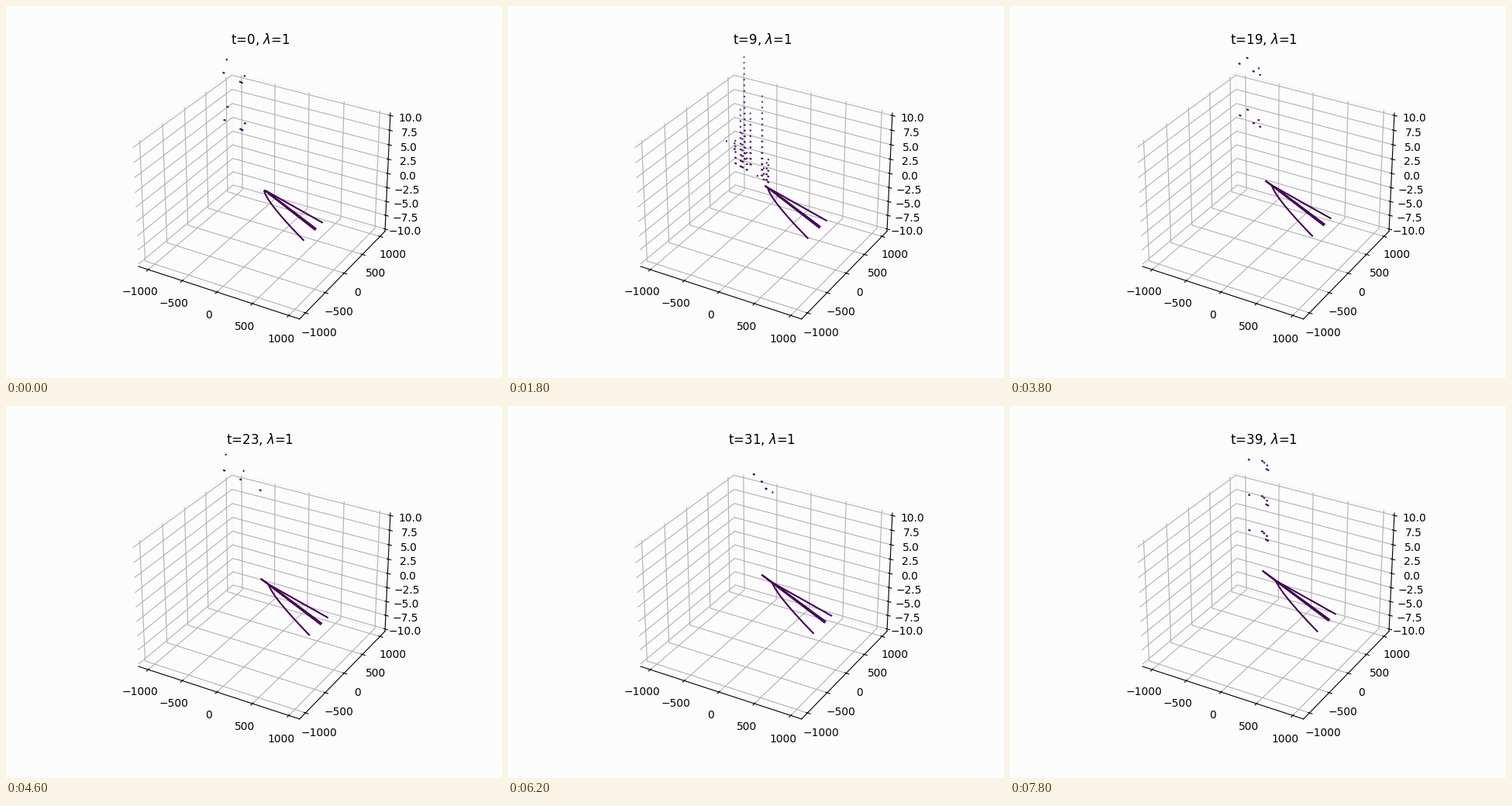
Recreate the animation shown at these times as a matplotlib script. Size 640x480 px, loop 8000 ms.

```python
import random

import numpy as np
import matplotlib.pyplot as plt
from matplotlib.animation import FuncAnimation
from matplotlib.collections import LineCollection

FRAMES, STEP_MS = 40, 200
W, H = 640, 480
TOP = 58               # upper clip edge of the plot, in pixels
LEVELS = 50
SLOPES = .58, .97      # two ridges that meet at the fork, on screen
LOW = "#440154"
BACK = "#fcfcfc"


def move(start, end, t):
    return np.array(start) + (np.array(end) - np.array(start)) * t / (FRAMES - 1)


def bezier(a, b, c):
    u = np.linspace(0, 1, 40)[:, None]
    return (1 - u) ** 2 * a + 2 * u * (1 - u) * b + u ** 2 * c


def fork_at(t):
    return move((335.5, 238.3), (344.5, 226), t)


def branches(t):
    fork = fork_at(t)
    tip = move((332.5, 237.2), (325, 211.8), t)
    upper = move((408.3, 279.3), (420, 268.3), t)
    mid = move((400, 287.3), (412.3, 275.5), t)
    low = move((384, 302.3), (396.7, 291), t)
    bend = move((336, 253.5), (350.5, 243.5), t)
    root = move((332.5, 237.5), (342.5, 225), t)
    side = np.array([-1.2, 1.5])
    return [np.array([tip, fork, upper]),
            np.array([fork, mid]),
            np.array([tip + .5, fork + side * .4, mid + side]),
            bezier(root, bend, low)]


def level_gap(t):
    """Distance between contour levels, in pixels."""
    return np.interp(t, [0, 6, 9, 15, 23, 31, 39],
                     [61, 200, 7.3, 18.6, 115, 116, 45.5])


def dots(t):
    """Columns of tiny contours above random points of the two ridges."""
    rng = random.Random(t)
    fork_x, fork_y = fork_at(t)
    gap = level_gap(t)
    segs, colors = [], []
    for i in range(5 + int(60 / gap)):
        back = rng.uniform(2, 62)
        x, base = fork_x - back, fork_y - back * SLOPES[i % 2]
        count = 1 + int(7 * rng.expovariate(1))
        for k in range(1, count + 1):
            rise = gap * k
            y = base - rise
            if y < TOP:
                break
            half = 1.5 - .6 * k / count
            cx = x + (x - 322) * .0005 * rise
            segs.append([(cx - half, y - .35 * half), (cx + half, y + .35 * half)])
            colors.append(plt.cm.viridis(k / LEVELS))
    return segs, colors


fig = plt.figure(figsize=(W / 100, H / 100), dpi=100, facecolor=BACK)
ax = fig.add_subplot(projection="3d")
ax.set_facecolor(BACK)
margin = 25 / 24
ticks = np.arange(-1000, 1001, 500)
ax.set_xticks(ticks)
ax.set_yticks(ticks)
ax.set_zticks(np.arange(-10, 10.1, 2.5))
ax.set_xlim(-1100 * margin, 1100 * margin)
ax.set_ylim(-1100 * margin, 1100 * margin)
ax.set_zlim(-10 * margin, 10 * margin)
ax.tick_params(axis="x", pad=3.6)
for axis in (ax.xaxis, ax.yaxis, ax.zaxis):
    axis.pane.set_facecolor("none")
    axis.pane.set_edgecolor("#f0f0f0")
title = ax.set_title("", y=1)
title.set_y(1)         # 3D axes lower the title by default

# pixel-sized layer for the contour lines
layer = fig.add_axes([0, 0, 1, 1])
layer.set_xlim(-.5, W - .5)
layer.set_ylim(H - .5, -.5)
layer.axis("off")
curves = LineCollection([], colors=LOW, linewidths=1.5)
specks = LineCollection([], linewidths=1.6)
layer.add_collection(curves, autolim=False)
layer.add_collection(specks, autolim=False)


def update(t):
    title.set_text(rf"t={t}, $\lambda$=1")
    curves.set_segments(branches(t))
    segs, colors = dots(t)
    specks.set_segments(segs)
    specks.set_color(colors)
    return title, curves, specks


anim = FuncAnimation(fig, update, frames=FRAMES, interval=STEP_MS,
                     repeat=True, repeat_delay=0, blit=False)
plt.show()
```
